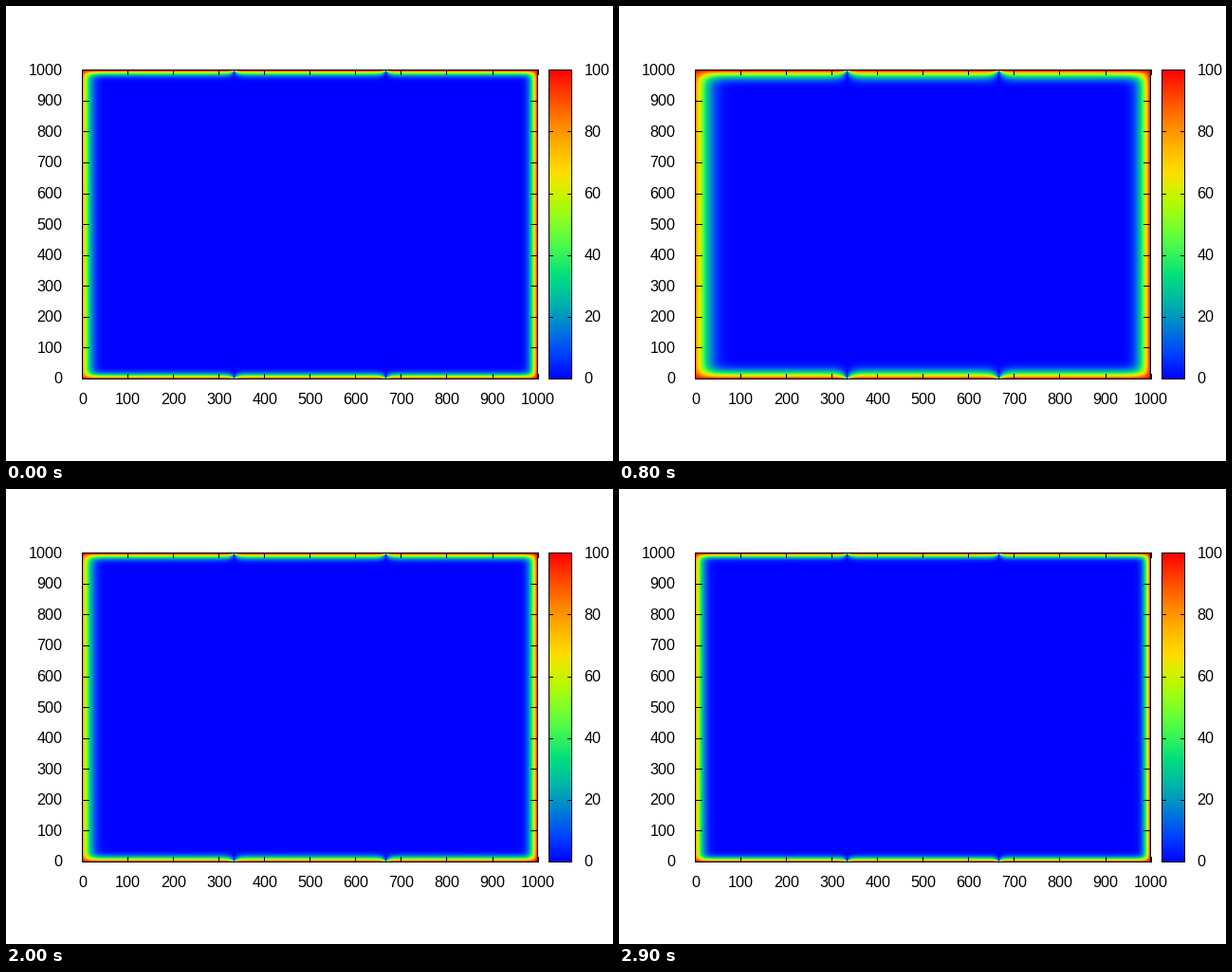
A matplotlib script for the animation above (3000 ms loop, 640x480 px).

```python
import math
import numpy as np
import matplotlib.pyplot as plt
from matplotlib.animation import FuncAnimation

plt.rcParams["text.hinting"] = "native"
plt.rcParams["text.hinting_factor"] = 1

W, H, DPI = 640, 480, 100
LEFT, RIGHT, TOP, BOTTOM = 80, 560, 67, 393
SX, SY = 2.08, 3.07          # grid cells per pixel
COLD = (240.5, 400.5)        # cold columns that split the plate
FRAMES = 30

grid = np.linspace(0, 4, 2001)
erf_grid = np.array([math.erf(v) for v in grid])


def erf(v):
    return np.interp(v, grid, erf_grid)


def erfc(v):
    return 1 - erf(v)


def palette(v):
    """Blue - green - yellow - red ramp for v in 0..1."""
    rgb = np.stack([3 * v - 1, np.sin(np.pi * v), 1.16 - 2 * v], axis=-1)
    return np.clip(rgb, 0, 1)


xs = np.arange(LEFT + 1, RIGHT) + 0.5
ys = np.arange(TOP + 1, BOTTOM) + 0.5
from_left = (xs - 80.5) * SX
from_right = (560.2 - xs) * SX
from_top = (ys - 68) * SY
from_bottom = (393 - ys) * SY + 0.5
from_cold = np.maximum(np.min([abs(xs - c) for c in COLD], axis=0) * SX, 0.3)

q = (np.arange(48) + 0.5) * (3.2 / 48)


def hot_edge(d, s):
    """Heat entering from a hot edge at distance d, next to the cold columns."""
    out = np.zeros((len(d), len(xs)))
    for i in np.flatnonzero(d < 5 * s):
        a = d[i] / (2 * s)
        v = a + q
        w = np.exp(-v * v)
        w *= erfc(a) / w.sum()
        out[i] = erf(np.outer(from_cold / d[i], v)) @ w
    return out


def plate(s):
    # the left side is cooler at the rim but reaches further in
    sides = 0.85 * erfc(from_left / (2.6 * s)) + erfc(from_right / (2 * s))
    ends = hot_edge(from_top, s) + hot_edge(from_bottom, s)
    return 1 - (1 - sides) * (1 - ends)


def depth(i):
    """Diffusion length; the motion pauses once every 14 frames."""
    n = i - i // 14
    return np.interp(n, [0, 5, 8, 12, 16, 22, 27],
                     [9.3, 13.1, 14.9, 9.4, 11.7, 8, 8.5])


def box(img, x0, y0, x1, y1):
    img[[y0, y1], x0:x1 + 1] = 0
    img[y0:y1 + 1, [x0, x1]] = 0


def draw_axes(img):
    box(img, LEFT, TOP, RIGHT, BOTTOM)
    for k in range(11):
        x = round(LEFT + 48.06 * k)
        y = round(BOTTOM - 32.58 * k)
        img[TOP:TOP + 6, x] = 0
        img[BOTTOM - 5:BOTTOM + 1, x] = 0
        img[y, LEFT:LEFT + 8] = 0
        img[y, RIGHT - 7:RIGHT + 1] = 0


base = np.ones((H, W, 3))
ramp = np.linspace(1, 0, BOTTOM - TOP + 1)
base[TOP:BOTTOM + 1, 572:597] = palette(ramp)[:, None]
box(base, 572, TOP, 596, BOTTOM)
for k in range(6):
    y = round(BOTTOM - 65.15 * k)
    base[y, 572:577] = 0
    base[y, 592:597] = 0


def picture(i):
    img = base.copy()
    img[TOP + 1:BOTTOM, LEFT + 1:RIGHT] = palette(plate(depth(i)))
    draw_axes(img)
    return img


fig = plt.figure(figsize=(W / DPI, H / DPI), dpi=DPI, facecolor="white")
ax = fig.add_axes([0, 0, 1, 1])
ax.axis("off")
view = ax.imshow(picture(0), extent=(0, W, H, 0), interpolation="nearest",
                 aspect="auto")
ax.set_xlim(0, W)
ax.set_ylim(H, 0)


def label(x, y, value, align):
    ax.text(x, round(y), str(value), ha=align, va="baseline",
            family="Liberation Sans", size=16 * 72 / DPI, color="black")


for k in range(11):
    label(80.5 + 48.06 * k, 420, 100 * k, "center")
    label(59.5, 398.5 - 32.58 * k, 100 * k, "right")
for k in range(6):
    label(609.5, 398.5 - 65.15 * k, 20 * k, "left")


def update(i):
    view.set_data(picture(i))
    return [view]


anim = FuncAnimation(fig, update, frames=FRAMES, interval=100, repeat=True)
plt.show()
```
